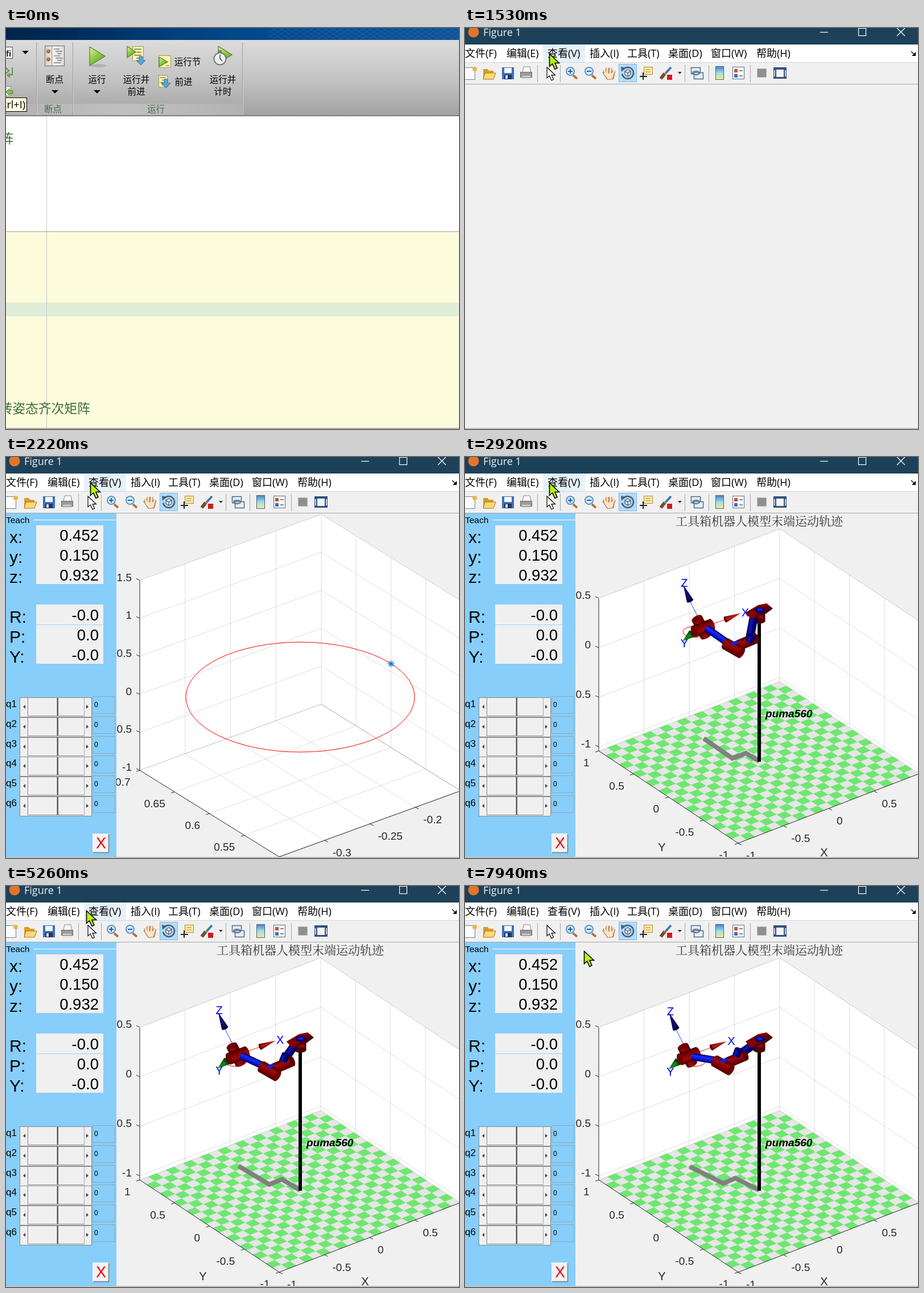
These frames come from a looping animation (796 by 704 pixels, 8 s). An HTML page with a canvas:

```html
<!DOCTYPE html>
<html lang="zh">
<head>
<meta charset="utf-8">
<style>
html,body{margin:0;width:100%;height:100%;overflow:hidden;background:#f0f0f0}
canvas{display:block}
</style>
</head>
<body>
<canvas id="c" width="796" height="704"></canvas>
<script>
const g = document.getElementById('c').getContext('2d');
const UI = '"Open Sans","Noto Sans CJK SC","Noto Sans CJK",sans-serif';
const THIN = '"Noto Sans CJK SC Light","Noto Sans CJK SC","Noto Sans CJK",sans-serif';
const ARIAL = '"Liberation Sans",Arial,sans-serif';

function rect(x, y, w, h, c) { g.fillStyle = c; g.fillRect(x, y, w, h); }
function frame(x, y, w, h, c, lw = 1) {
  g.strokeStyle = c; g.lineWidth = lw; g.strokeRect(x, y, w, h);
}
function line(c, w, ...p) {
  g.strokeStyle = c; g.lineWidth = w; g.beginPath();
  for (let i = 0; i < p.length; i += 2) g.lineTo(p[i], p[i + 1]);
  g.stroke();
}
function poly(c, ...p) {
  g.fillStyle = c; g.beginPath();
  for (let i = 0; i < p.length; i += 2) g.lineTo(p[i], p[i + 1]);
  g.closePath(); g.fill();
}
function oval(c, x, y, rx, ry = rx, rot = 0, stroke = 0) {
  g.beginPath(); g.ellipse(x, y, rx, ry, rot, 0, 7);
  if (stroke) { g.strokeStyle = c; g.lineWidth = stroke; g.stroke(); }
  else { g.fillStyle = c; g.fill(); }
}
function text(s, x, y, size, c = '#000', align = 'left', fam = ARIAL, style = '') {
  g.font = `${style} ${size}px ${fam}`; g.fillStyle = c; g.textAlign = align; g.fillText(s, x, y);
}
function grad(x0, y0, x1, y1, ...cs) {
  const k = g.createLinearGradient(x0, y0, x1, y1);
  cs.forEach((c, i) => k.addColorStop(i / (cs.length - 1), c));
  return k;
}

/* ---------- editor ---------- */
function sheet(x, y, s, off) {
  rect(x, y, 18 * s, 24 * s, off ? '#c9c9c9' : '#fbf3b6');
  frame(x + .5, y + .5, 18 * s, 24 * s, off ? '#9c9c9c' : '#b09a45');
  for (let i = 0; i < 4; i++) line(off ? '#a2a2a2' : '#7c7448', 1.5 * s, x + (i % 2 ? 7 : 3) * s, y + (5 + i * 5) * s, x + 15 * s, y + (5 + i * 5) * s);
}
function play(x, y, w, h, off) {
  poly(off ? '#c4c4c4' : grad(x, y, x + w, y + h, '#dff0b0', '#8cc63f', '#5c9a22'), x, y, x + w, y + h / 2, x, y + h);
  line(off ? '#959595' : '#4f7d22', 1.2, x, y, x + w, y + h / 2, x, y + h, x, y);
}
function down(x, y, off) {
  poly(off ? '#a9a9a9' : '#5aa7d6', x - 3, y, x + 3, y, x + 3, y + 7, x + 8, y + 7, x, y + 15, x - 8, y + 7, x - 3, y + 7);
  line(off ? '#8c8c8c' : '#2c6f9f', 1, x + 3, y, x + 3, y + 7, x + 8, y + 7, x, y + 15, x - 8, y + 7, x - 3, y + 7, x - 3, y, x + 3, y);
}
const caret = (x, y) => poly('#000', x - 6, y - 3, x + 6, y - 3, x, y + 3);

function editor(t) {
  const off = t >= 1040, run = t < 1160, ink = off ? '#3c3c3c' : '#000';
  rect(0, 0, 796, 704, '#fff');
  rect(0, 0, 796, 21, grad(0, 0, 796, 0, '#00254b', '#003063', '#04427f', '#0f4f92', '#175796'));
  [125, 195, 272, 373].forEach((x, i) => rect(x, 0, 796 - x, 21, `rgba(0,80,150,${.08 + i * .02})`));
  g.save(); g.beginPath(); g.rect(460, 0, 336, 21); g.clip();
  for (let x = 440; x < 830; x += 13) {
    line('rgba(90,150,210,.22)', 1, x, 0, x + 36, 21);
    line('rgba(90,150,210,.22)', 1, x + 36, 0, x, 21);
  }
  g.restore();
  rect(0, 21, 796, 133, grad(0, 21, 0, 154, '#dcdcdc', '#c4c4c4', '#a2a2a2'));
  rect(0, 133, 415, 20, grad(0, 0, 415, 0, '#b2b2b2', '#c0c0c0', '#b2b2b2'));
  for (const x of [53, 117, 415]) { rect(x, 25, 1, 128, '#a0a0a0'); rect(x + 1, 25, 1, 128, '#d2d2d2'); }
  rect(0, 153, 796, 2, '#7f7f7f');
  if (t >= 930 && run) {
    rect(124, 26, 73, 102, 'rgba(255,255,255,.45)');
    frame(124.5, 26.5, 72, 102, '#8fa9bd');
  }

  // cropped controls on the left
  rect(-8, 33, 20, 21, '#f4f4f4'); frame(-8.5, 33.5, 20, 20, '#555');
  text('fi', 0, 50, 15, '#222', 'left', ARIAL, 'bold');
  caret(34, 43);
  line('#6c8f5c', 2, 0, 70, 5, 75, 0, 80); line('#6c8f5c', 2, 11, 69, 11, 82, 2, 82);
  poly('#62a548', 1, 83, 7, 78, 7, 88);
  rect(-4, 103, 13, 17, '#e8e8e0'); frame(-4.5, 102.5, 13, 17, '#888');
  poly('#8cc63f', 0, 112, 6, 107, 6, 110, 12, 110, 12, 115, 6, 115, 6, 118);
  line('#4d7c23', 1, 0, 112, 6, 107, 6, 110, 12, 110, 12, 115, 6, 115, 6, 118, 0, 112);

  // breakpoints
  rect(69, 32, 33, 34, grad(69, 0, 102, 0, '#d0d0d0', '#f4f4f4', '#dcdcdc')); frame(68.5, 31.5, 34, 35, '#6d6d6d');
  line('#8a8a8a', 1, 80.5, 32, 80.5, 66);
  for (const y of [41, 55]) { oval('#b0622d', 74.5, y, 3.4); oval('#dd9b68', 74, y - 1, 1.3); }
  for (let i = 0; i < 7; i++) line('#777', 1.4, 84 + i % 3 * 3, 37 + i * 4, 94 + i * 5 % 7, 37 + i * 4);
  const lab = (s, x, y, c = '#000') => text(s, x, y, 15.5, c, 'center', UI);
  lab('断点', 85.5, 96); caret(86, 112);

  oval('rgba(60,60,60,.18)', 162, 66, 14, 3);
  if (run) play(147, 33, 27, 33, false);
  else for (const x of [147, 162]) {
    rect(x, 34, 11, 31, grad(x, 0, x + 11, 0, '#4f93cd', '#dff0fc', '#5597cf')); frame(x + .5, 34.5, 10, 30, '#3a6ea5');
  }
  lab(run ? '运行' : '暂停', 160, 96); caret(160, 112);

  sheet(222, 32, 1.05, off); play(213, 32, 15, 20, off); down(237, 50, off);
  lab('运行并', 229, 96, ink); lab('前进', 229, 117, ink);
  rect(269, 49, 21, 21, off ? '#cacaca' : '#fbf3b6'); frame(268.5, 48.5, 21, 21, off ? '#999' : '#a99547');
  line(off ? '#999' : '#777', 1.3, 281, 66, 287, 66); play(269, 51, 15, 17, off);
  lab('运行节', 319, 65, ink);
  sheet(268, 83, .85, off); down(281, 90, off);
  lab('前进', 312, 100, ink);
  play(373, 32, 24, 30, off);
  oval(off ? '#cfcfcf' : '#eef0f0', 376, 54, 10.5); oval(off ? '#999' : '#777', 376, 54, 10.5, 10.5, 0, 2);
  rect(373, 39, 6, 4, off ? '#999' : '#777');
  line(off ? '#8d8d8d' : '#444', 1.5, 376, 47, 376, 54, 380, 58);
  lab('运行并', 381, 96, ink); lab('计时', 381, 117, ink);
  lab('断点', 82.5, 148, '#45734c'); lab('运行', 263.5, 148, '#45734c');

  // document
  rect(0, 358, 796, 344, '#fcfbdc');
  rect(0, 482, 796, 24, '#dfeed8');
  rect(71, 155, 1, 549, '#c9c9c5');
  rect(0, 357, 796, 1, '#a2a29a'); rect(0, 702, 796, 2, '#b3b3aa');
  const note = (s, x, y) => text(s, x, y, 22.8, '#3b6e3b', 'right', THIN, '300');
  note('阵', 13, 202); note('转姿态齐次矩阵', 148, 676);
  if (t < 70) {
    rect(-2, 122, 39, 25, '#ffffe1'); frame(-2.5, 122.5, 39, 24, '#000');
    text('(Ctrl+I)', 34, 141, 18, '#000', 'right', UI);
  }
}

/* ---------- figure window ---------- */
const menus = ['文件(F)', '编辑(E)', '查看(V)', '插入(I)', '工具(T)', '桌面(D)', '窗口(W)', '帮助(H)'];
const menuX = [0, 73, 145, 219, 285, 357, 432, 512];

function lens(x, plus) {
  line('#b5723a', 4, x + 5, 83, x + 12, 89);
  oval('#d3ecfb', x, 76, 7); oval('#5f93c4', x, 76, 7, 7, 0, 2);
  line('#1c5fb0', 2, x - 4, 76, x + 4, 76);
  if (plus) line('#1c5fb0', 2, x, 72, x, 80);
}
function tools() {
  // new, open, save, print
  rect(-2, 69, 20, 21, '#fdfdfd'); frame(-2.5, 69.5, 20, 21, '#5e86a8'); oval('#f0b442', 17, 72, 4);
  poly('#d99b2b', 32, 72, 40, 72, 42, 75, 50, 75, 50, 90, 32, 90);
  poly('#fbd977', 35, 79, 54, 79, 50, 90, 32, 90); line('#a8741c', 1, 35, 79, 54, 79, 50, 90, 32, 90, 35, 79);
  rect(65, 69, 21, 21, '#3f6fb5'); rect(69, 70, 13, 9, '#f2f6fb'); rect(69, 82, 13, 8, '#1e3763'); rect(71, 83, 4, 6, '#dfe6ee');
  poly('#fafafa', 103, 68, 114, 68, 116, 78, 101, 78); line('#888', 1, 103, 68, 114, 68, 116, 78, 101, 78, 103, 68);
  rect(97, 77, 21, 9, '#9b9b9b'); rect(100, 84, 15, 6, '#dedede'); frame(97.5, 77.5, 20, 9, '#666');
  for (const x of [127, 167, 386, 428, 501]) rect(x, 65, 1, 30, '#a6a6a6');
  g.save(); g.translate(144, 69); g.scale(.85, .85);
  arrow('#fff', 1.4); g.restore();
  lens(185, true); lens(218, false);
  // hand
  line('#b07a48', 5.5, 247, 80, 245, 74); line('#b07a48', 5.5, 250, 80, 250, 70);
  line('#b07a48', 5.5, 255, 80, 256, 70); line('#b07a48', 5.5, 259, 81, 262, 75);
  poly('#b07a48', 241, 78, 245, 77, 264, 77, 261, 90, 250, 91);
  line('#fbe3c8', 3.2, 247, 81, 245, 74); line('#fbe3c8', 3.2, 250, 81, 250, 70);
  line('#fbe3c8', 3.2, 255, 81, 256, 70); line('#fbe3c8', 3.2, 259, 81, 262, 75);
  poly('#fbe3c8', 243, 79, 247, 80, 262, 79, 259, 89, 251, 90);
  // rotate
  rect(270, 63, 32, 32, '#b4dcf7'); frame(270.5, 63.5, 31, 31, '#7db8e0');
  g.strokeStyle = '#4b5f78'; g.lineWidth = 2.6; g.beginPath(); g.arc(286, 79, 10, -2.5, 3); g.stroke();
  poly('#4b5f78', 274, 68, 282, 70, 275, 77);
  poly('#e7eef5', 286, 73, 291, 76, 291, 82, 286, 85, 281, 82, 281, 76);
  line('#4b5f78', 1.3, 281, 76, 286, 79, 291, 76, 291, 82, 286, 85, 281, 82, 281, 76, 286, 73, 291, 76); line('#4b5f78', 1.3, 286, 79, 286, 85);
  // data cursor, brush
  rect(314, 68, 15, 13, '#fbe9a9'); frame(314.5, 68.5, 15, 13, '#b58a3c');
  line('#b58a3c', 1, 317, 73, 326, 73); line('#b58a3c', 1, 317, 77, 326, 77);
  line('#222', 2, 313, 78, 313, 91); line('#222', 2, 307, 85, 320, 85);
  line('#4c74ab', 4, 362, 69, 352, 80); line('#7c4a28', 6, 351, 80, 344, 89); rect(355, 82, 9, 9, '#d11a1a');
  poly('#333', 374, 77, 381, 77, 377.5, 81);
  // link, colorbar, legend, plot tools
  for (const [x, y] of [[397, 69], [402, 78]]) { rect(x, y, 16, 11, '#e4edf6'); frame(x + .5, y + .5, 16, 11, '#4e6d8c', 1.5); }
  oval('#5a6c80', 406, 79, 6, 3, 0, 2);
  rect(441, 68, 14, 22, grad(0, 68, 0, 90, '#4f83cf', '#9be0e6', '#f6ea8b')); frame(440.5, 67.5, 14, 23, '#48607c');
  rect(470, 68, 21, 22, '#fbfbfb'); frame(470.5, 68.5, 20, 21, '#566f8a');
  rect(473, 72, 6, 6, '#d34a3a'); rect(473, 81, 6, 6, '#3b6fc4');
  line('#555', 1.4, 482, 75, 488, 75); line('#555', 1.4, 482, 84, 488, 84);
  rect(514, 72, 15, 15, '#8f8f8f'); frame(513.5, 71.5, 16, 15, '#b9b9b9');
  rect(542, 69, 23, 20, '#34507c'); rect(547, 73, 13, 13, '#f3f3f3'); rect(543, 74, 2, 11, '#c6d6ea'); rect(562, 74, 2, 11, '#c6d6ea');
}
function chrome([mx, my]) {
  rect(0, 0, 796, 29, '#1d4159');
  oval('#e2752b', 15, 7, 9.5);
  text('Figure 1', 32, 14, 18, '#f2f2f2', 'left', UI);
  line('#fff', 1.2, 624, 7.5, 638, 7.5); frame(691.5, .5, 13, 13, '#fff', 1.2);
  line('#fff', 1.3, 759, 0, 773, 14); line('#fff', 1.3, 773, 0, 759, 14);
  rect(0, 29, 796, 32, '#fff');
  menus.forEach((m, i) => {
    const x = menuX[i], end = (menuX[i + 1] || 580) - 8;
    if (my > 28 && my < 61 && mx >= x - 8 && mx < end) rect(x - 8, 29, end - x + 8, 31, '#e5f1fb');
    text(m, x, 51, 18, '#000', 'left', UI);
  });
  line('#000', 1.3, 784, 41, 790, 47); poly('#000', 792, 42, 792, 49, 785, 49);
  rect(0, 60, 796, 1, '#d5d5d5'); rect(0, 61, 796, 37, '#f0f0f0');
  if (my > 62 && my < 96 && mx > 171) rect(mx < 204 ? 172 : 204, 63, 33, 32, '#d5e6f4');
  tools();
  rect(0, 98, 796, 1, '#a5a5a5'); rect(0, 702, 796, 2, '#c2c2c2');
}

const DARK = '#262626', PALE = 'rgba(38,38,38,.15)', TILES = 21;
function axes({ L, U, V, H, z0, dz, zl, yl, xl, tiles }) {
  const at = (u, v, h = 0) => [L[0] + U[0] * u + V[0] * v, L[1] + U[1] * u + V[1] * v - h];
  const quad = (c, ...ps) => poly(c, ...ps.flat());
  quad('#fff', at(0, 0), at(1, 0), at(1, 0, H), at(0, 0, H));
  quad('#fff', at(1, 0), at(1, 1), at(1, 1, H), at(1, 0, H));
  quad(tiles ? '#e6e6e6' : '#fff', at(0, 0), at(1, 0), at(1, 1), at(0, 1));
  for (let k = .25; k <= 1; k += .25) {
    line(PALE, 1, ...at(k, 0), ...at(k, 0, H)); line(PALE, 1, ...at(1, k), ...at(1, k, H));
    if (!tiles) { line(PALE, 1, ...at(k, 0), ...at(k, 1)); line(PALE, 1, ...at(0, k), ...at(1, k)); }
  }
  line(PALE, 1, ...at(0, 0), ...at(1, 0), ...at(1, 1));
  zl.forEach((_, i) => { const h = z0 + dz * i; line(PALE, 1, ...at(0, 0, h), ...at(1, 0, h), ...at(1, 1, h)); });
  if (tiles) for (let i = 0; i < TILES; i++) for (let j = 0; j < TILES; j++) if ((i + j) % 2) {
    const a = i / TILES, b = j / TILES, d = 1 / TILES;
    quad('#6fe672', at(a, b), at(a + d, b), at(a + d, b + d), at(a, b + d));
  }
  line(DARK, 1, ...at(0, 0, H), ...at(0, 0), ...at(0, 1), ...at(1, 1));
  zl.forEach((s, i) => {
    const [x, y] = at(0, 0, z0 + dz * i);
    line(DARK, 1, x, y, x - 6, y - 3); text(s, x - 14, y + 1, 19, DARK, 'right');
  });
  yl.forEach((s, i) => {
    const [x, y] = at(0, i / 4);
    line(DARK, 1, x, y, x - 6, y + 2); text(s, x - 16.5, y + 27, 19, DARK, 'right');
  });
  xl.forEach((s, i) => {
    const [x, y] = at(i / 4, 1);
    line(DARK, 1, x, y, x + 6, y + 3); text(s, x + 14, y + 28, 19, DARK);
  });
}
const unit = ['-1', '-0.5', '0', '0.5', '1'];
const wide = { L: [269, 543], U: [280, -109], V: [217, 142], H: 312, z0: 6, dz: 76.5, zl: unit, yl: [...unit].reverse(), xl: unit, tiles: true };
const ring = { L: [235, 550], U: [319, -116], V: [245, 152], H: 333, z0: 0, dz: 66.7, zl: [...unit, '1.5'], yl: ['0.7', '0.65', '0.6', '0.55'], xl: ['', '-0.3', '-0.25', '-0.2'] };
const near = { L: [235, 516], U: [318, -122], V: [245, 162], H: 267, z0: 7, dz: 87, zl: unit.slice(0, 4), yl: wide.yl, xl: unit, tiles: true };

const RED = ['#3f0000', '#9c0b0b', '#850000', '#420000'];
const BLUE = ['#000050', '#1a2cff', '#0a16d8', '#000058'], NAVY = ['#00004a', '#1018b8', '#000078', '#000040'];
function cyl(x1, y1, x2, y2, w, cs = RED, cap = '#6e0000') {
  const a = Math.atan2(y2 - y1, x2 - x1), n = Math.hypot(x2 - x1, y2 - y1), r = w / 2;
  g.save(); g.translate(x1, y1); g.rotate(a);
  const fill = grad(0, -r, 0, r, ...cs);
  oval(fill, 0, 0, r * .45, r);
  rect(0, -r, n, w, fill);
  oval(cap, n, 0, r * .45, r);
  g.restore();
}
function cone(x1, y1, x2, y2, r, c, edge) {
  const n = Math.hypot(x2 - x1, y2 - y1), nx = (y1 - y2) / n * r, ny = (x2 - x1) / n * r;
  poly(grad(x1 + nx, y1 + ny, x1 - nx, y1 - ny, edge, c, edge), x1 + nx, y1 + ny, x2, y2, x1 - nx, y1 - ny);
  oval(edge, x1, y1, r * .4, r, Math.atan2(y2 - y1, x2 - x1));
}
const tag = (s, x, y, c = '#0000ff') => text(s, x, y + 7, 20, c, 'center');
const model = (x, y) => text('puma560', x, y + 6, 19, '#000', 'left', ARIAL, 'italic bold');

function upright() {
  line('#808080', 8, 517, 559, 578, 537, 566, 525);
  line('#000', 6, 517, 340, 517, 560);
  cyl(555, 291, 562, 287, 10, BLUE, '#000070');
  cyl(517, 341, 517, 309, 20);
  cyl(506, 318, 529, 332, 20);
  cyl(564, 298, 564, 276, 19);
  cyl(564, 280, 564, 240, 13, NAVY, '#00006a');
  cyl(564, 294, 589, 310, 19);
  cyl(527, 323, 574, 304, 12, BLUE, '#0b18c8');
  line('#5f8f5f', 1, 540, 208, 553, 216); cone(539, 208, 519, 197, 6, '#1c5a26', '#082010');
  cyl(564, 240, 564, 210, 20);
  cyl(552, 217, 575, 232, 19);
  line('#0a0aff', 1, 564, 208, 564, 214); line('#0a0aff', 1, 561, 213, 568, 213);
  line('#e03020', 1, 577, 221, 600, 211); cone(599, 211, 623, 202, 5, '#c02418', '#5c0804');
  tag('X', 631, 202); tag('Y', 524, 195); tag('Z', 570, 160);
  model(527, 485);
}

function tracing(t) {
  const base = t < 6310 ? 2450 : 6310;
  const time = base + Math.floor((t - base + 10) / 234) * 234;
  const deg = 36.5 + (time - 2450) * .0153, a = deg * Math.PI / 180;
  const px = 403 + 20 * Math.cos(a), py = 307 - 9.7 * Math.sin(a);
  const u = (deg - 91.5) / 29;
  const via = (p, q, r) => q + (r - p) / 2 * u + (p + r - 2 * q) / 2 * u * u;
  const ex = via(467, 460, 453), ey = via(330, 322, 315);
  line('#808080', 8, 517, 534, via(489, 482, 475), via(517, 514, 513), via(466, 460, 454), via(526, 523, 522), px + 2, py + 194);
  oval('#ff0000', 403, 307, 20, 9.7, 0, 1);
  line('#000', 6, 517, 285, 517, 535);
  cyl(517, 270, 517, 288, 21, RED, '#4c0000');
  // upper arm, partly hidden by the elbow's rear half
  const kx = via(492, 483, 476), ky = via(316, 305, 300);
  cyl(kx, ky, 508, 278, 15, NAVY, '#000070');
  cyl(ex + 9, ey - 5, ex + 40, ey - 18, 19, RED, '#560000');
  cyl(kx + 1, ky - 3, kx + 5, ky - 13, 14, NAVY, '#000078');
  poly(grad(500, 260, 520, 284, '#7d0505', '#8c0000', '#3a0000'), 493, 273, 515, 260, 530, 257, 541, 266, 529, 275, 503, 285);
  line('#3a0000', 1, 494, 274, 517, 262, 540, 266);
  oval('#000070', 518, 269, 9, 5); oval('#1020e8', 518, 268, 5, 2.5);
  line('#e03020', 1, px + 20, py - 8, px + 40, py - 15);
  line('#3040ff', 1, px - 9, py - 21, px - 23, py - 49);
  cone(px - 19, py + 10, px - 35, py + 23, 7, '#128a1c', '#054008');
  cyl(px + 6, py + 14, px - 10, py - 17, 20);
  cyl(px + 16, py - 6, px - 15, py + 6, 21);
  cyl(px + 8, py + 1, ex - 8, ey - 8, 13, BLUE, '#0c18c0');
  cyl(ex - 14, ey - 8, ex + 14, ey + 8, 21);
  oval('#1020ff', ex + 2, ey - 9, 7, 3, -.4);
  cone(px + 40, py - 15, px + 67, py - 26, 5.5, '#c01c14', '#600606');
  cone(px - 22, py - 48, px - 34, py - 76, 6, '#101078', '#000038');
  tag('X', px + 75, py - 27); tag('Z', px - 32, py - 79); tag('Y', px - 32, py + 27);
  model(528, 451);
  tag('X', 631, 694, DARK); tag('Y', 346, 685, DARK);
  text('工具箱机器人模型末端运动轨迹', 517, 120, 21, '#333', 'center', '"Noto Serif CJK SC",' + THIN, '300');
}

function panel(full) {
  rect(0, 99, 194, 603, '#87cefa');
  rect(48, 110, 146, 1, '#fff');
  text('Teach', 0, 116, 15.5);
  if (full) {
    rect(53, 120, 118, 103, '#f0f0f0'); rect(53, 259, 118, 104, '#f0f0f0'); rect(53, 294, 118, 1, '#9ed5f8');
    ['x:', 'y:', 'z:', 'R:', 'P:', 'Y:'].forEach((s, i) => {
      const y = (i < 3 ? 147 : 182) + i * 35;
      text(s, 6, y + 4, 30);
      text(['0.452', '0.150', '0.932', '-0.0', '0.0', '-0.0'][i], 163, y, 27.5, '#000', 'right');
    });
  }
  for (let i = 0; i < 6; i++) {
    const y = Math.round(421 + i * 34.8);
    text('q' + (i + 1), 0, y + 18, 17);
    rect(24, y + 1, 127, 34, '#f0f0f0'); frame(24.5, y + 1.5, 126, 34, '#888');
    rect(38, y + 2, 1, 32, '#777'); rect(39, y + 2, 1, 32, '#fff');
    rect(89, y + 2, 1, 32, '#a0a0a0'); rect(90, y + 2, 2, 32, '#5f5f5f'); rect(137, y + 2, 1, 32, '#a9a9a9');
    rect(38, y + 33, 99, 1, '#888');
    poly('#444', 34, y + 14, 34, y + 21, 30, y + 17.5); poly('#444', 141, y + 14, 141, y + 21, 145, y + 17.5);
    frame(152.5, y - .5, 39, 30, '#93a9b8'); text('0', 155, y + 18, 12);
  }
  rect(152, 661, 29, 34, '#f3f3f3'); line('#777', 1.5, 153, 694.5, 180.5, 694.5, 180.5, 662);
  text('X', 167, 687, 27, '#f00000', 'center');
}

function figure(t, m) {
  rect(0, 0, 796, 704, '#f0f0f0');
  if (t >= 2450) { axes(near); tracing(t); }
  else if (t >= 2220) {
    axes(ring);
    oval('#ff0000', 517, 421.5, 201, 96.5, 0, 1);
    for (let i = 0; i < 4; i++) {
      const c = 6 * Math.cos(i * Math.PI / 4), s = 6 * Math.sin(i * Math.PI / 4);
      line('#0072bd', 1.4, 676.5 - c, 363 - s, 676.5 + c, 363 + s);
    }
  } else if (t >= 1640) {
    axes(wide);
    tag('Y', 358, 696, DARK); tag('X', 626, 703, DARK);
    g.save(); g.translate(203, 385); g.rotate(-Math.PI / 2); tag('Z', 0, 0, DARK); g.restore();
    if (t >= 1760) upright();
  }
  if (t >= 1880) panel(t >= 1990);
  chrome(m);
}

/* ---------- pointer ---------- */
function arrow(c, w) {
  const p = [0, 0, 0, 22, 5, 17.5, 9.5, 27, 13.5, 25, 9.5, 16, 17, 16];
  poly(c, ...p); line('#000', w, ...p, 0, 0, 0, 4);
}
const path = [
  [0, -40, 120], [70, -25, 118], [820, 148, 45], [4100, 148, 45], [4330, 147, 44], [4790, 142, 44], [5260, 141, 43],
  [5490, 133, 46], [5720, 108, 48], [5950, 150, 64], [6190, 220, 83], [6310, 220, 87], [7010, 209, 114], [8000, 209, 114]
];
function pointer(t) {
  const q = 1760 + Math.floor((t - 1760 + 15) / 116.6) * 116.6;
  const i = Math.max(1, path.findIndex(p => p[0] > q));
  const [a, b] = [path[i - 1], path[i]], k = Math.max(0, (q - a[0]) / (b[0] - a[0]));
  return [a[1] + (b[1] - a[1]) * k, a[2] + (b[2] - a[2]) * k];
}

function draw(now) {
  const t = now % 8000, m = pointer(t);
  if (t < 1530) editor(t); else figure(t, m);
  g.save(); g.translate(m[0] + .5, m[1] + .5); arrow('#b9f20a', 1.6); g.restore();
}
const start = performance.now();
(function tick() {
  draw(performance.now() - start);
  requestAnimationFrame(tick);
})();
</script>
</body>
</html>
```
